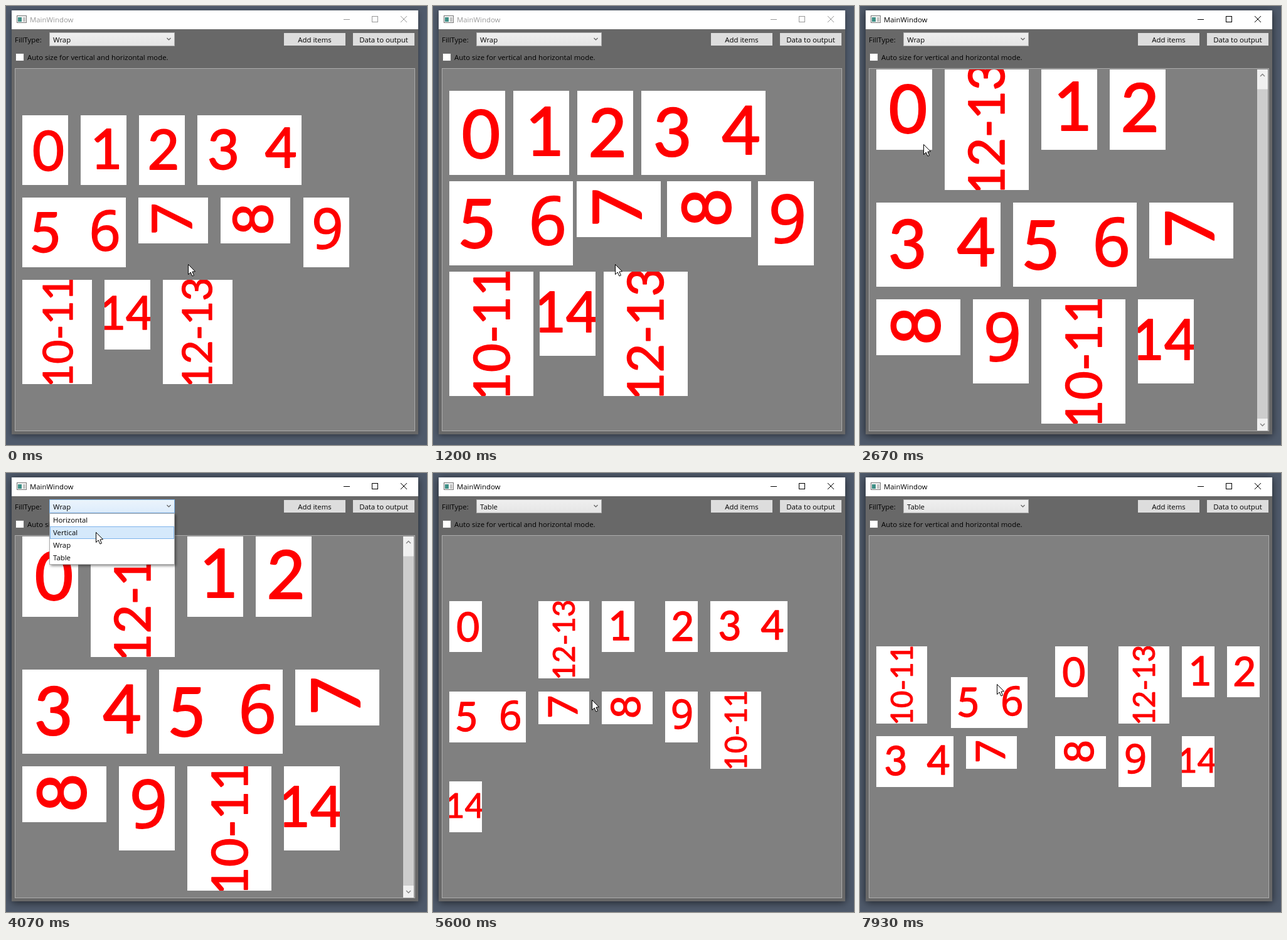
Animation, 671 px wide and 699 px high, one loop 8000 ms. Source, as an HTML page with a canvas:

```html
<!DOCTYPE html>
<html lang="en">
<head>
<meta charset="utf-8">
<title>Card layout demo</title>
<style>
html, body { margin: 0; width: 100%; height: 100%; overflow: hidden; background: #4f5a6b; }
canvas { display: block; }
</style>
</head>
<body>
<canvas width="671" height="699"></canvas>
<script>
const ctx = document.querySelector('canvas').getContext('2d');
const FPS = 15, LOOP = 8000, GAP = 20, LEFT = 26, MID = 388, BOTTOM = 665;
const UI = '11.4px "Open Sans", "Noto Sans", sans-serif';

// Cards: [text, centre x, centre y, font size] as fractions of the card and its short height
const cards = {
  a: [['0', .57, .51, .79]],
  b: [['1', .568, .482, .79]],
  c: [['2', .535, .49, .79]],
  d: [['3', .247, .487, .79], ['4', .8, .465, .79]],
  e: [['5', .22, .505, .79], ['6', .8, .47, .79]],
  f: [['7', .48, .46, .79]],
  g: [['8', .464, .47, .79]],
  h: [['9', .525, .45, .79]],
  i: [['10-11', .505, .5, .59]],
  j: [['14', .5, .475, .67]],
  k: [['12-13', .495, .5, .59]]
};

// All times below are in ticks of 1/15 s
const cardWidth = [[2, 73], [6, 47.7], [12, 47.7], [18, 89], [76, 89], [77, 78.3], [84, 51.6]];
const mouse = [
  [22, 290, 411], [25, 355, 453], [28, 312, 303], [34, 311, 141], [36, 83, 138], [38, 83, 138],
  [40, 101, 220], [48, 150, 55], [58, 150, 55], [64, 135, 132], [68, 135, 132], [71, 253, 361],
  [87, 253, 361], [91, 498, 382], [92, 498, 382], [99, 167, 372], [100, 152, 359],
  [104, 90, 228], [105, 90, 228], [111, 99, 430], [112, 99, 430], [118, 218, 330], [119, 218, 336]
];
const grabK = { drag: 'k', grab: [66, 10] };
const grabI = { drag: 'i', grab: [56, 35], table: true, cols: 5 };
const grabE = { drag: 'e', grab: [73, 11], table: true };
const stages = [
  { at: 0, order: 'abcdefghijk' },
  { at: 25, order: 'abcdefghijk', ...grabK },
  { at: 27, order: 'abcdefkghij', ...grabK },
  { at: 32, order: 'akbcdefghij', ...grabK },
  { at: 38.7, order: 'akbcdefghij' },
  { at: 67, order: 'akbcdefghij', table: true, dur: 4 },
  { at: 92, order: 'akbcdefghij', ...grabI },
  { at: 94, order: 'akbcdefgihj', ...grabI },
  { at: 97, order: 'akbcdeifghj', ...grabI },
  { at: 101.5, order: 'iakbcdefghj', ...grabI },
  { at: 105.2, order: 'iakbcdefghj', table: true },
  { at: 112, order: 'iakbcdefghj', ...grabE },
  { at: 117.5, order: 'ieakbcdfghj', ...grabE }
];

const lerp = (a, b, p) => a + (b - a) * p;

function track(keys, n) {
  const i = keys.findIndex(k => k[0] > n);
  if (i < 0) return keys[keys.length - 1].slice(1);
  if (!i) return keys[0].slice(1);
  const [a, b] = [keys[i - 1], keys[i]], p = (n - a[0]) / (b[0] - a[0]);
  return a.slice(1).map((v, j) => lerp(v, b[j + 1], p));
}

const shortHeight = w => 1.42 * w + 7.6;

function sizeOf(id, w) {
  const h = shortHeight(w);
  if (id === 'd') return [2 * w + GAP, h];
  if (id === 'e') return [2 * w + GAP - 1, h];
  if ('fg'.includes(id)) return [h, w];
  if ('ik'.includes(id)) return [h, 2 * w + GAP];
  return [w, h];
}

function wrap({ order, drag }, w, avail) {
  const pos = {};
  let x = 0, y = 0, row = 0;
  for (const id of order) {
    const [cw, ch] = sizeOf(id, w);
    if (x && x + cw > avail) { y += row + GAP; x = row = 0; }
    pos[id] = [x, y];
    x += cw + GAP;
    if (id !== drag) row = Math.max(row, ch);
  }
  return { pos, height: y + row };
}

function grid({ order, cols }, w, avail) {
  const ids = [...order], sizes = ids.map(id => sizeOf(id, w)), pos = {};
  const widest = n => {
    const out = Array(n).fill(0);
    sizes.forEach((s, i) => out[i % n] = Math.max(out[i % n], s[0]));
    return out;
  };
  let n = cols || ids.length;
  const total = () => widest(n).reduce((a, b) => a + b) + GAP * (n - 1);
  while (!cols && n > 1 && total() > avail) n--;
  const widths = widest(n);
  let y = 0, height = 0;
  for (let r = 0; r < ids.length; r += n) {
    let x = 0, row = 0;
    for (let i = r; i < Math.min(r + n, ids.length); i++) {
      pos[ids[i]] = [x, y];
      x += widths[i - r] + GAP;
      row = Math.max(row, sizes[i][1]);
    }
    height = y + row;
    y = height + GAP;
  }
  return { pos, height };
}

function flow(stage, w) {
  const run = stage.table ? grid : wrap;
  const free = run(stage, w, 616);
  return free.height > 555 ? { ...run(stage, w, 598), scroll: true } : free;
}

// While cards grow, their places follow one tick late
function arrange(stage, n) {
  const w = track(cardWidth, n)[0], late = Math.min(w, track(cardWidth, n - 1)[0]);
  const { height, scroll } = flow(stage, w), { pos } = flow(stage, late);
  const top = scroll ? BOTTOM - height : MID - height / 2;
  for (const id in pos) pos[id] = [LEFT + pos[id][0], top + pos[id][1]];
  return { pos, height, scroll };
}

function ghost(stage, n) {
  const [x, y] = track(mouse, n);
  return [x - stage.grab[0], y - stage.grab[1]];
}

function rect(x, y, w, h, fill, stroke) {
  ctx.fillStyle = fill;
  ctx.fillRect(x, y, w, h);
  if (!stroke) return;
  ctx.strokeStyle = stroke;
  ctx.lineWidth = 1;
  ctx.strokeRect(x + .5, y + .5, w - 1, h - 1);
}

function line(points, color, width = 1) {
  ctx.beginPath();
  points.forEach(p => ctx.lineTo(...p));
  ctx.strokeStyle = color;
  ctx.lineWidth = width;
  ctx.stroke();
}

function label(text, x, y, color = '#000', align = 'left') {
  ctx.font = UI;
  ctx.textAlign = align;
  ctx.fillStyle = color;
  ctx.fillText(text, x, y);
}

function drawCard(id, [x, y], w) {
  const [cw, ch] = sizeOf(id, w).map(Math.round);
  ctx.save();
  ctx.translate(Math.round(x), Math.round(y));
  ctx.beginPath();
  ctx.rect(0, 0, cw, ch);
  ctx.clip();
  rect(0, 0, cw, ch, '#fff');
  ctx.fillStyle = ctx.strokeStyle = '#f00';
  ctx.lineJoin = 'round';
  ctx.textAlign = 'left';
  for (const [text, fx, fy, scale] of cards[id]) {
    const size = scale * shortHeight(w), face = /[69]/.test(text) ? '"Open Sans"' : 'Lato';
    ctx.font = `${size}px ${face}, sans-serif`;
    ctx.lineWidth = size * .02;
    const m = ctx.measureText(text);
    const tx = (m.actualBoundingBoxLeft - m.actualBoundingBoxRight) / 2;
    const ty = (m.actualBoundingBoxAscent - m.actualBoundingBoxDescent) / 2;
    ctx.save();
    ctx.translate(fx * cw, fy * ch);
    if ('fgik'.includes(id)) ctx.rotate(-Math.PI / 2);
    ctx.fillText(text, tx, ty);
    ctx.strokeText(text, tx, ty);
    ctx.restore();
  }
  ctx.restore();
}

function drawWindow(n) {
  const active = n >= 25, ink = active ? '#000' : '#999';
  rect(0, 0, 671, 699, '#4f5a6b');
  ctx.save();
  ctx.shadowColor = active ? 'rgba(0,0,0,.6)' : 'rgba(0,0,0,.4)';
  ctx.shadowBlur = active ? 12 : 8;
  ctx.shadowOffsetY = 2;
  rect(9, 7, 648, 675, '#686868');
  ctx.restore();
  rect(9, 7, 648, 30, '#fff');

  rect(17, 15, 16, 12, '#f4f4f4', '#777');
  rect(19, 18, 6, 7, '#3f8f86');
  rect(27, 18, 4, 7, '#c4c4c4');
  label('MainWindow', 38, 26, ink);
  line([[538, 21.5], [548, 21.5]], ink);
  ctx.strokeRect(583.5, 16.5, 9, 9);
  line([[629, 16], [639, 26]], ink);
  line([[639, 16], [629, 26]], ink);

  label('FillType:', 14, 58);
  const hover = n >= 47 && n < 69;
  const face = ctx.createLinearGradient(0, 42, 0, 64);
  face.addColorStop(0, hover ? '#ecf4fc' : '#f0f0f0');
  face.addColorStop(1, hover ? '#dcecfc' : '#e5e5e5');
  rect(69, 42, 200, 22, face, hover ? '#7eb4ea' : '#acacac');
  label(n < 68 ? 'Wrap' : 'Table', 75, 58);
  line([[256.5, 51], [259.5, 54], [262.5, 51]], '#606060', 1.2);

  rect(443, 43, 98, 20, '#ddd');
  label('Add items', 492, 58, '#000', 'center');
  rect(553, 43, 98, 20, '#ddd');
  label('Data to output', 602, 58, '#000', 'center');
  rect(15, 75, 14, 13, '#fff', '#707070');
  label('Auto size for vertical and horizontal mode.', 34, 86);
  rect(14, 99, 638, 578, '#808080', '#acacac');
}

function drawScrollbar(height) {
  rect(633, 101, 17, 575, '#f0f0f0');
  const thumb = 539 * 576 / (height + 22);
  rect(633, 657 - thumb, 17, thumb, '#cdcdcd');
  line([[638, 112], [641.5, 108.5], [645, 112]], '#808080', 1.3);
  line([[638, 665], [641.5, 668.5], [645, 665]], '#808080', 1.3);
}

function drawMenu(n) {
  if (n < 53 || n >= 68) return;
  const y = track(mouse, n)[1];
  ctx.save();
  ctx.globalAlpha = Math.min(1, (n - 52) / 3);
  ctx.save();
  ctx.shadowColor = 'rgba(0,0,0,.45)';
  ctx.shadowBlur = 4;
  ctx.shadowOffsetX = ctx.shadowOffsetY = 2;
  rect(69, 64, 200, 82, '#fff');
  ctx.restore();
  rect(69, 64, 200, 82, '#fff', '#acacac');
  ['Horizontal', 'Vertical', 'Wrap', 'Table'].forEach((name, i) => {
    const top = 65 + 20 * i, over = y >= 65 ? y >= top && y < top + 20 : i === 2;
    if (over) rect(70, top, 198, 20, '#d5e9fb', '#7eb4ea');
    label(name, 75, top + 14);
  });
  ctx.restore();
}

function drawCursor([x, y]) {
  ctx.save();
  ctx.translate(Math.round(x) + .5, Math.round(y) + .5);
  ctx.beginPath();
  [[0, 0], [0, 16], [3.7, 12.5], [6.4, 18.5], [9, 17.4], [6.4, 11.6], [11, 11.2]]
    .forEach(p => ctx.lineTo(...p));
  ctx.closePath();
  ctx.fillStyle = '#fff';
  ctx.fill();
  ctx.strokeStyle = '#000';
  ctx.lineWidth = 1;
  ctx.stroke();
  ctx.restore();
}

function draw(n) {
  const index = stages.findLastIndex(s => s.at <= n);
  const stage = stages[index], before = stages[index - 1];
  const w = track(cardWidth, n)[0], now = arrange(stage, n);
  const p = Math.min(1, (n - stage.at) / (stage.dur || 1.17));
  if (before && p < 1) {
    const old = arrange(before, n).pos;
    if (before.drag) old[before.drag] = ghost(before, stage.at);
    for (const id in old) now.pos[id] = now.pos[id].map((v, j) => lerp(old[id][j], v, p));
  }
  if (stage.drag) now.pos[stage.drag] = ghost(stage, n);

  drawWindow(n);
  ctx.save();
  ctx.beginPath();
  ctx.rect(15, 101, 636, 575);
  ctx.clip();
  for (const id of stage.order) drawCard(id, now.pos[id], w);
  if (now.scroll) drawScrollbar(now.height);
  ctx.restore();
  drawMenu(n);
  drawCursor(track(mouse, n));
}

const start = performance.now();
function tick() {
  const t = (performance.now() - start) % LOOP;
  // Each tick starts on a whole 10 ms, up to 4 ms early
  draw(Math.floor((t + 5) * FPS / 1000));
  requestAnimationFrame(tick);
}
tick();
</script>
</body>
</html>
```
